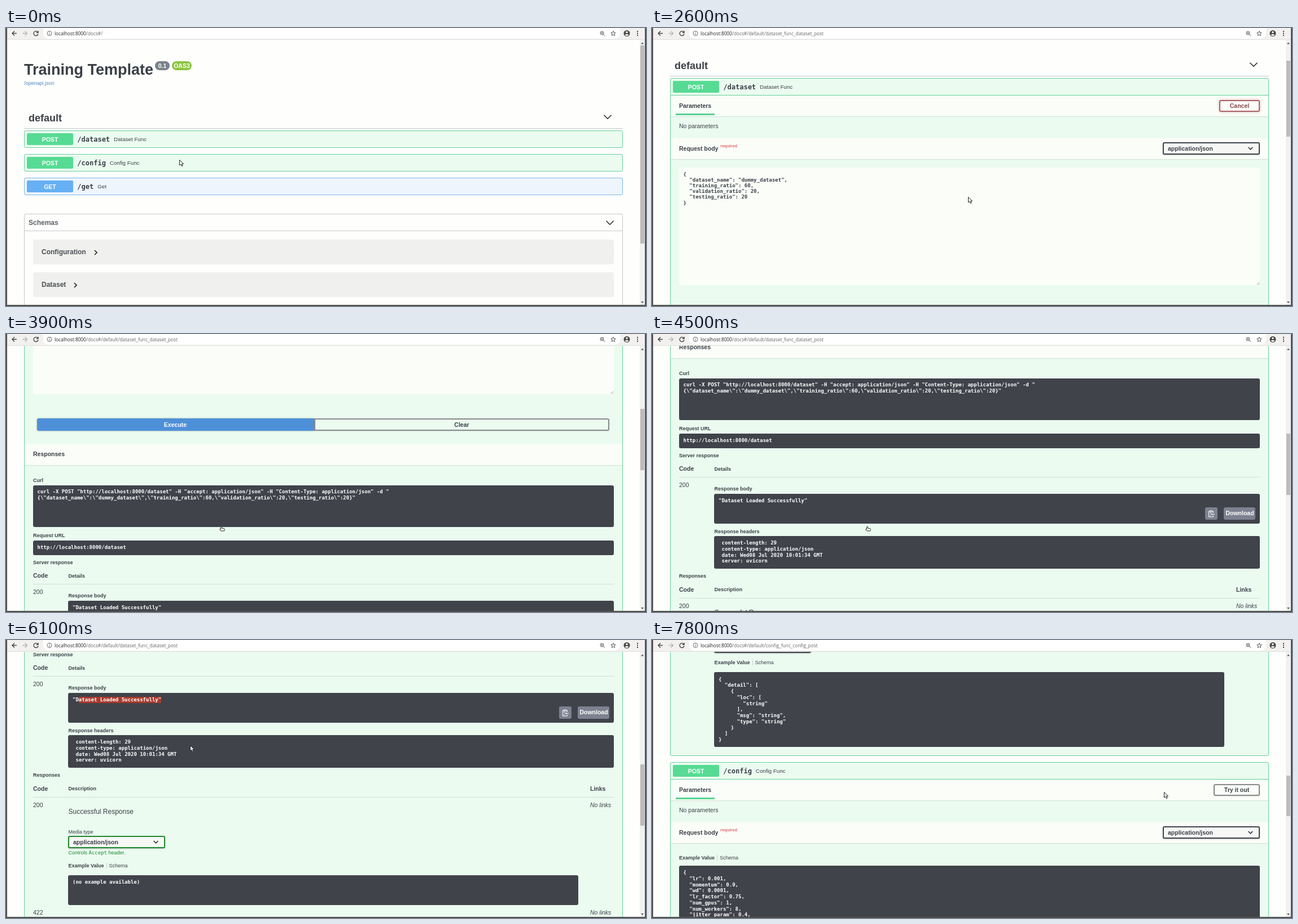
Write an HTML page that moves like this. It is 1134 by 494 pixels and loops after 8 s.

```html
<!DOCTYPE html>
<html lang="en">
<head>
<meta charset="utf-8">
<title>API docs</title>
<style>
html, body { margin: 0; width: 100%; height: 100%; overflow: hidden; }
#stage { position: relative; width: 1134px; height: 494px; overflow: hidden; background: #fefefd;
  font: 10.5px/20px "Liberation Sans", Arial, sans-serif; color: #3b4047; }
#stage div, #stage svg, .t, pre { position: absolute; box-sizing: border-box; }
[hidden] { display: none !important; }
.t, pre { white-space: pre; margin: 0; }
.t.c { transform: translateX(-50%); }
.b { font-weight: 700; }
.i { font-style: italic; }
.w { color: #fff; }
.s9 { font-size: 9px; }
.s12 { font-size: 12px; }
.m, pre { font-family: "DejaVu Sans Mono", monospace; font-weight: 700; }
pre { font-size: 9px; line-height: 10.75px; color: #fff; }
svg { overflow: visible; fill: none; stroke: #222; left: 0; top: 0; width: 1px; height: 1px; }
#view { left: 2px; top: 21px; width: 1121px; height: 471px; overflow: hidden; }
#doc { left: -2px; top: -21px; width: 1134px; }
.g { left: 0; top: 0; }
.panel { left: 32px; width: 1061px; height: 31px; overflow: hidden; border: 1px solid #64d09b;
  border-radius: 3px; background: #ebfbf0; }
.panel.get { border-color: #7bb8ec; background: #eef5fd; }
.panel > .in { left: -33px; top: -183px; }
.verb { background: #57db94; border-radius: 2px; }
.get .verb { background: #66b0f3; }
.strip { background: #fafdf8; box-shadow: 0 1px 1px rgba(0,0,0,.1); }
.dark { background: #40434a; border-radius: 3px; }
.sel { background: #f7f7f6; border: 2px solid #41444e; border-radius: 3px; box-shadow: 0 1px 2px rgba(0,0,0,.25); }
.sel.ok { border-color: #1d8a2b; }
.btn { border: 2px solid #878a8c; border-radius: 3px; box-shadow: 0 1px 2px rgba(0,0,0,.1); }
.cancel { border-color: #ac6065; box-shadow: 0 0 4px rgba(190,70,70,.45); }
.exec { background: #4e90d8; border-radius: 3px; box-shadow: 0 0 3px rgba(0,0,0,.35); }
.grey { background: #7d8190; border-radius: 3px; }
.line { height: 1px; background: #d0dfd6; }
.item { background: #f0f0ef; border-radius: 3px; }
.edge { background: #514f4c; }
.url { font: 8.29px/20px "Open Sans", sans-serif; color: #666; }
.url b { font-weight: 400; color: #222; }
</style>
</head>
<body>
<div id="stage"></div>
<script>
const $ = id => document.getElementById(id);
const txt = (x, y, s, cls = '', css = '', id = '') =>
  `<span id="${id}" class="t ${cls}" style="left:${x}px;top:${y - 10}px;${css}">${s}</span>`;
const box = (x, y, r, b, cls, css = '', id = '') =>
  `<div id="${id}" class="${cls}" style="left:${x}px;top:${y}px;width:${r - x}px;height:${b - y}px;${css}"></div>`;
const mono = (x, y, s, css = '') => `<pre style="left:${x}px;top:${y - 5.4}px;${css}">${s}</pre>`;
const path = (d, css = '') => `<svg><path d="${d}" style="${css}"/></svg>`;
const group = (id, s) => `<div class="g" id="${id}">${s}</div>`;
const down = (x, y, w, h) => path(`M${x - w} ${y - h}L${x} ${y + h}L${x + w} ${y - h}`, 'stroke-width:1.5');
const select = (x, y, cls = '') => box(x, y, x + 172, y + 22, 'sel ' + cls) +
  txt(x + 9, y + 11, 'application/json', 'b') + down(x + 155.5, y + 11, 3.8, 2);
const tabs = (x, y) => txt(x, y, 'Example Value', 'b s9') + box(x + 67, y - 5, x + 68, y + 5, '', 'background:#c5d2ca') +
  txt(x + 72, y, 'Schema', 's9');

const panel = (id, top, verb, name, label, body = '') =>
  `<div class="panel ${verb == 'GET' ? 'get' : ''}" id="${id}" style="top:${top}px"><div class="in">` +
  box(37, 187, 119, 208, 'verb') + txt(78, 197.5, verb, 'b w c') +
  txt(126.3, 197.5, name, 'm s12') + txt(133.3 + name.length * 7.224, 197.5, label, '', 'font-size:9.75px') +
  body + '</div></div>';

const intro = box(33, 212, 1092, 213, '', 'background:#64d09b') +
  box(33, 213, 1092, 250, 'strip') + txt(48, 231, 'Parameters', 'b') +
  box(42, 245, 111, 248, '', 'background:#57d293') + txt(48, 267, 'No parameters') +
  box(33, 289, 1092, 326, 'strip') + txt(48, 307, 'Request body', 'b') +
  txt(121, 303, 'required', 'b', 'font-size:7.5px;color:#e2686c') + select(905, 296);
const tryBtn = box(995, 221, 1077, 242, 'btn') + txt(1036, 231, 'Try it out', 'b c');
const example = (json, bottom) => tabs(48, 352) + box(48, 366, 1077, bottom, 'dark') + mono(55.5, 378.5, json);

const dataJson = `{
  "dataset_name": "dummy_dataset",
  "training_ratio": 60,
  "validation_ratio": 20,
  "testing_ratio": 20
}`;
const confJson = `{
  "lr": 0.001,
  "momentum": 0.9,
  "wd": 0.0001,
  "lr_factor": 0.75,
  "num_gpus": 1,
  "num_workers": 8,
  "jitter_param": 0.4,`;
const errJson = `{
  "detail": [
    {
      "loc": [
        "string"
      ],
      "msg": "string",
      "type": "string"
    }
  ]
}`;
const curl = `curl -X POST "http://localhost:8000/dataset" -H "accept: application/json" -H "Content-Type: application/json" -d "
{\\"dataset_name\\":\\"dummy_dataset\\",\\"training_ratio\\":60,\\"validation_ratio\\":20,\\"testing_ratio\\":20}"`;
const headers = `content-length: 29
content-type: application/json
date: Wed08 Jul 2020 10:01:34 GMT
server: uvicorn`;

const form = box(1005, 221, 1077, 242, 'btn cancel') + txt(1041, 231, 'Cancel', 'b c', 'color:#874a4d') +
  box(48, 341, 1077, 550, '', 'background:#fafdf8') +
  mono(55.5, 353, dataJson, 'color:#3b4047;line-height:10.2px') +
  path('M1072 549l4-4m-1 4l1-1', 'stroke:#777;stroke-width:.8') +
  box(55, 593, 1069, 615, 'exec', '', 'exec') + txt(562.5, 604, 'Execute', 'b w c', '', 'execTxt') +
  group('clear', box(546, 593, 1069, 615, 'btn', 'border-radius:0 3px 3px 0') + txt(807.5, 604, 'Clear', 'b c'));

const live = txt(48, 703, 'Curl', 'b s9') + box(48, 712, 1077, 786, 'dark') + mono(55.5, 723.5, curl, 'line-height:10.5px') +
  txt(48, 801, 'Request URL', 'b s9') + box(48, 810, 1077, 836, 'dark') + mono(55.5, 822.5, 'http://localhost:8000/dataset') +
  txt(48, 848.5, 'Server response', 'b s9') + txt(48, 872, 'Code', 'b') + txt(110.5, 872.5, 'Details', 'b s9') +
  box(48, 887, 1077, 888, 'line') + txt(48, 901, '200') + txt(110.5, 908, 'Response body', 'b s9') +
  box(110, 917, 1077, 970, 'dark') + box(129, 924, 275, 935, '', 'background:#a93b2d', 'mark') +
  mono(118, 929.5, '"Dataset Loaded Successfully"') +
  box(980, 941, 1002, 963, 'grey') +
  path('M988 948h-1.5v10h8v-2M993 948h1.5v3M988.5 947h4v2h-4zM997 953.500h-6m2-2l-2 2l2 2M988 951h3M988 956h2', 'stroke:#fff') +
  box(1013, 941, 1069, 963, 'grey') + txt(1041.5, 951, 'Download', 'b w c') +
  txt(110.5, 983.5, 'Response headers', 'b s9') + box(110, 992, 1077, 1050, 'dark') + mono(123.5, 1004.5, headers) +
  txt(48, 1063, 'Responses', 'b s9');

const result = (y, code, title) => txt(48, y, code) + txt(1035, y, 'No links', 'i') +
  txt(110.5, y + 12.5, title, 's12') + txt(110.5, y + 48, 'Media type', 's9');
const table = txt(48, 1086.5, 'Code', 'b') + txt(110.5, 1087, 'Description', 'b s9') + txt(1035, 1086.5, 'Links', 'b') +
  box(48, 1102, 1077, 1103, 'line') + result(1115.5, 200, 'Successful Response') + select(110, 1171, 'ok') +
  txt(110.5, 1200.5, 'Controls <span class="m" style="font-weight:400">Accept</span> header.', 's9', 'color:#1d8a2b') +
  tabs(110.5, 1224) + box(110, 1240.5, 1014, 1294, 'dark') + mono(118, 1253.5, '(no example available)') +
  result(1307, 422, 'Validation Error') + select(110, 1362) +
  tabs(110.5, 1401) + box(110, 1418, 1014, 1551, 'dark') + mono(118, 1431, errJson);

const dataBody = intro + group('example', tryBtn + example(dataJson, 445)) + group('form', form) +
  group('resp', box(33, 638, 1092, 676, 'strip') + txt(48, 656, 'Responses', 'b') + group('live', live) + group('table', table));

const schema = ([name, w], i) => {
  const y = 376 + i * 58, x = 63 + w + 15;
  return box(48, y, 1077, y + 43.5, 'item') + txt(63, y + 21.8, name, 'b s12', 'color:#4b4e52') +
    path(`M${x} ${y + 19}l4 4l-4 4`, 'stroke-width:1.7');
};
const schemas = box(32, 330, 1093, 628, '', 'border:1px solid #c3c6c8;border-radius:3px') +
  txt(40, 345.5, 'Schemas', 'b s12', 'color:#5c6066') + box(33, 360, 1092, 361, '', 'background:#c9cbcd') +
  down(1070, 346, 6.5, 3.3) +
  [['Configuration', 79], ['Dataset', 43], ['HTTPValidationError', 120], ['ValidationError', 90]].map(schema).join('');

const doc = txt(32, 74, 'Training Template', 'b', 'font-size:27px') +
  box(264, 59, 290, 75, '', 'background:#7a828b;border-radius:9px') + txt(277, 66.5, '0.1', 'b w c') +
  box(294, 59, 329, 75, '', 'background:#8cc63f;border-radius:9px') + txt(311.5, 66.5, 'OAS3', 'b w c') +
  txt(32, 98, '/openapi.json', 's9', 'color:#4f88bd') + txt(40, 159.5, 'default', 'b', 'font-size:18px') +
  down(1066, 158, 6.5, 3.3) + box(32, 178, 1093, 179, '', 'background:#c5c7ca') +
  panel('data', 182, 'POST', '/dataset', 'Dataset Func', dataBody) +
  panel('conf', 224, 'POST', '/config', 'Config Func', intro + tryBtn + example(confJson, 800)) +
  group('rest', panel('get', 266, 'GET', '/get', 'Get') + schemas);

const chrome = box(0, 0, 1134, 21, '', 'background:#f2f1ef;border-bottom:1px solid #e0dfdc') +
  box(66, 0, 1088, 19, '', 'background:#fff;border-radius:0 0 9px 9px') +
  path('M19 9.500h-8m4-4l-4 4l4 4', 'stroke:#444;stroke-width:1.4') +
  path('M29.500 9.500h8m-4-4l4 4l-4 4', 'stroke:#b5b5b5;stroke-width:1.4') +
  path('M56.500 7.500a4 4 0 1 0 .5 3M57 5v3.200h-3.200', 'stroke:#444;stroke-width:1.4') +
  path('M73 9.500a4 4 0 1 0 8 0a4 4 0 1 0-8 0M77 9v3M77 7v1', 'stroke:#666') +
  txt(86, 9.5, '', 'url', '', 'url') +
  path('M1053 9a3 3 0 1 0 6 0a3 3 0 1 0-6 0M1058.200 11.200l3 3M1054.500 9h3M1056 7.500v3', 'stroke:#555') +
  path('M1076 5.500l1.200 2.800l3 .2l-2.300 2l.8 3l-2.700-1.600l-2.700 1.600l.8-3l-2.300-2l3-.2z', 'stroke:#555') +
  path('M1094.500 9.500a5.500 5.500 0 1 0 11 0a5.500 5.500 0 1 0-11 0', 'fill:#4a4a4a;stroke:none') +
  path('M1098.300 7.500a1.700 1.700 0 1 0 3.400 0a1.700 1.700 0 1 0-3.400 0M1096.500 12.300q3.500-3 7 0q-3.500 3.400-7 0', 'fill:#fff;stroke:none') +
  path('M1119 5v2m0 1.500v2m0 1.500v2', 'stroke:#444;stroke-width:2') +
  box(1123, 21, 1132, 492, '', 'background:#f1f1f0') + box(1124, 31, 1131, 60, '', 'background:#bcbbba', 'thumb') +
  path('M1125 28.500h5l-2.500-3z', 'fill:#555;stroke:none') + path('M1125 486h5l-2.500 3z', 'fill:#555;stroke:none') +
  box(0, 0, 2, 494, 'edge') + box(1132, 0, 1134, 494, 'edge') + box(0, 492, 1134, 494, 'edge');

const pointers = {
  arrow: 'M.5 .5v9.500l2.300-2l1.700 3.700l1.700-.8l-1.700-3.500h3z',
  hand: 'M-1.500 6v-4.500q1-1.300 1.800 0v2.500l4 .7q1.200.3 1 1.700l-.5 2.500h-6l-2.500-2.500q.2-1.300 2.200-.4',
  text: 'M-2-6q2 0 2 1.500v9q0 1.500-2 1.500M2-6q-2 0-2 1.500v9q0 1.500 2 1.500'
};
$('stage').innerHTML = `<div id="view"><div id="doc">${doc}</div></div>` + chrome +
  '<svg id="cursor"><path/></svg>';

// Tracks: [time, ...values]
const scrollTrack = [[0, 0], [2400, 0], [2500, 30], [2800, 220], [2900, 220], [3000, 253], [3600, 253], [3900, 443],
  [4200, 443], [4500, 633], [5700, 633], [6000, 823], [6100, 823], [6700, 1185], [7000, 1330], [7100, 1330], [7400, 1361]];
const moveTrack = [[0, 307, 234], [300, 391, 200], [500, 391, 200], [700, 391, 213], [1000, 391, 213], [1200, 640, 246],
  [1500, 1000, 230], [1800, 1000, 230], [2400, 560, 300], [3000, 560, 300], [3300, 382, 341], [4600, 382, 341],
  [4800, 287, 304], [5000, 287, 304], [5100, 291, 300], [5200, 291, 300], [5600, 129, 300], [5700, 129, 300],
  [6100, 326, 187], [7000, 326, 187], [7500, 880, 238], [7700, 880, 238], [7800, 907, 270]];
const kinds = [[0, 'arrow'], [200, 'hand'], [600, 'arrow'], [1500, 'hand'], [1700, 'arrow'], [3200, 'hand'],
  [4700, 'arrow'], [5100, 'text'], [5700, 'arrow'], [7400, 'hand'], [7800, 'arrow']];

const last = (track, t) => track.filter(k => k[0] <= t).pop();
function at(track, t) {
  const a = last(track, t), b = track[track.indexOf(a) + 1] || a;
  const p = a === b ? 0 : (t - a[0]) / (b[0] - a[0]);
  return a.slice(1).map((v, i) => v + (b[i + 1] - v) * p);
}
const shift = (id, y) => $(id).style.transform = `translateY(${y}px)`;

function draw(t) {
  const open = t >= 400, editing = t >= 1700, done = t >= 3500, conf = t >= 7700;
  const extra = !open ? 0 : done ? 1354 : editing ? 967 : 796;
  const more = conf ? 980 : 0;
  $('example').hidden = editing;
  $('form').hidden = !editing;
  $('live').hidden = $('clear').hidden = !done;
  $('exec').style.width = (done ? 492 : 1014) + 'px';
  $('execTxt').style.left = (done ? 300 : 562.5) + 'px';
  shift('resp', editing ? 0 : -171);
  shift('table', done ? 0 : -387);
  $('data').style.height = 31 + extra + 'px';
  $('conf').style.height = 31 + more + 'px';
  shift('conf', extra);
  shift('rest', extra + more);

  const scroll = Math.round(at(scrollTrack, t)[0]), full = 606 + extra + more;
  shift('doc', -scroll);
  $('thumb').style.top = 31 + 453 * scroll / full + 'px';
  $('thumb').style.height = 453 * 471 / full + 'px';

  const op = conf ? 'config' : 'dataset';
  $('url').innerHTML = '<b>localhost:8000</b>/docs#/' + (open ? `default/${op}_func_${op}_post` : '');

  const [x, y] = at(moveTrack, t), kind = last(kinds, t)[1];
  const from = t < 5300 ? 275 : t < 5600 ? Math.min(275, x) : 129;
  $('mark').style.left = from + 'px';
  $('mark').style.width = 275 - from + 'px';
  const p = $('cursor').firstChild;
  p.setAttribute('d', pointers[kind]);
  p.setAttribute('transform', `translate(${x} ${y})`);
  p.style.fill = kind == 'text' ? 'none' : '#fff';
  p.style.stroke = kind == 'text' ? '#ddd' : '#222';
}

let shown = -1;
function tick(now) {
  const t = Math.floor(now % 8000 / 100) * 100;
  if (t !== shown) draw(shown = t);
  requestAnimationFrame(tick);
}
draw(0);
requestAnimationFrame(tick);
</script>
</body>
</html>
```
